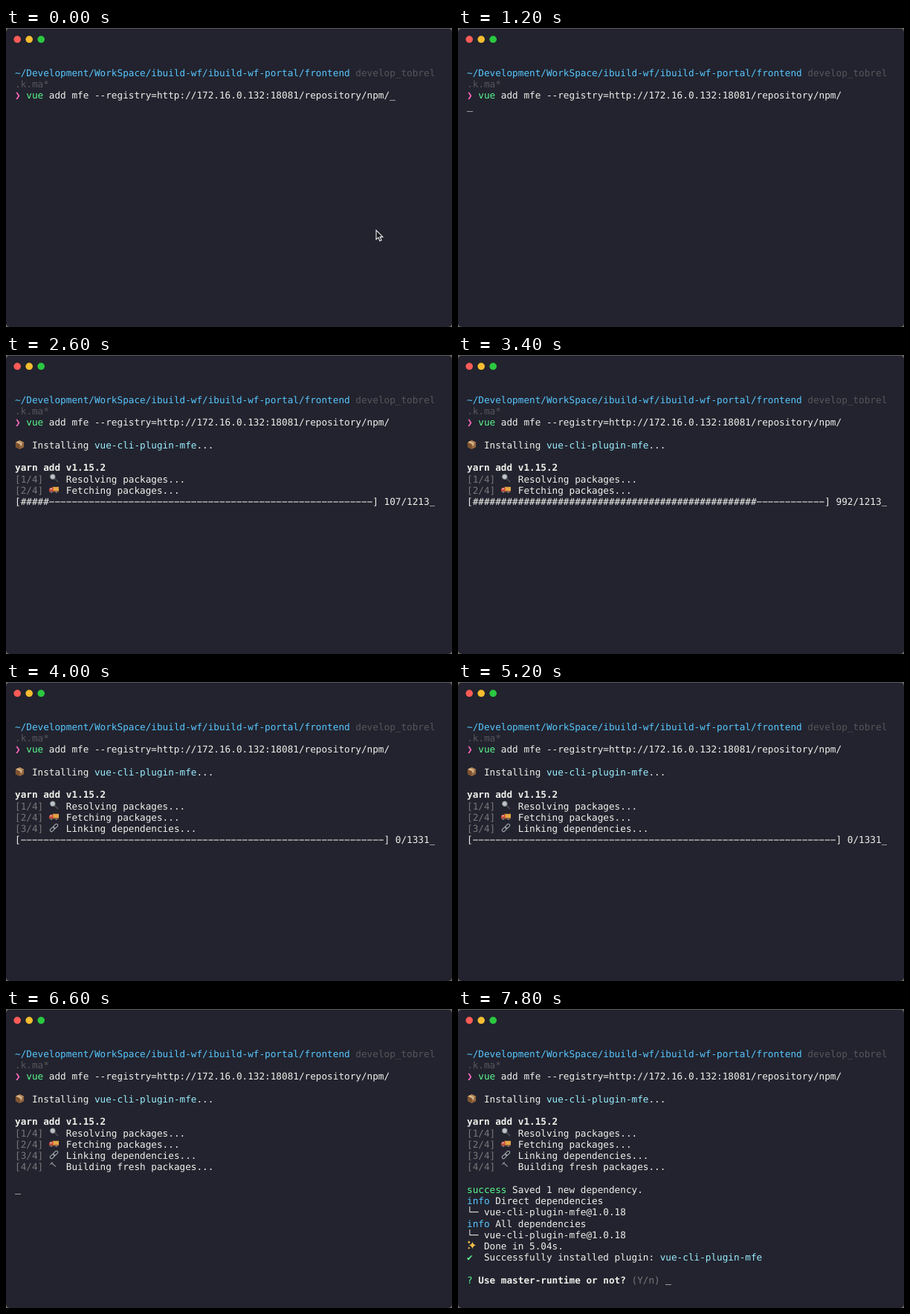
These frames come from a looping animation (600 px wide and 403 px high, 8000 ms). An HTML page:

```html
<!DOCTYPE html>
<html lang="en">
<head>
<meta charset="utf-8">
<title>Terminal</title>
<style>
  html, body { margin: 0; width: 100%; height: 100%; overflow: hidden; background: #77726a; }
  #window {
    position: absolute; left: 0; top: 0; width: 600px; height: 403px; overflow: hidden;
    background: #22232e; border-radius: 5px; box-shadow: inset 0 1px #5c5b5e;
  }
  #lights, #pointer { position: absolute; left: 0; top: 0; }
  #screen {
    position: absolute; left: 12px; top: 52.9px; color: #eff0eb;
    font: 12.69px/15.25px "DejaVu Sans Mono", monospace;
    text-rendering: geometricPrecision; font-variant-ligatures: none;
  }
  .line { position: absolute; left: 0; white-space: pre; }
  .blue { color: #57c7ff; }
  .green { color: #5af78e; }
  .pink { color: #ff6ac1; }
  .cyan { color: #9aedfe; }
  .grey { color: #77777a; }
  .dim { color: #56575c; }
  .sign { display: inline-block; width: 1ch; }
  .icon { display: inline-block; width: 2ch; height: 13px; vertical-align: -1px; }
  #cursor { position: absolute; width: 1ch; height: 1px; margin-top: 13.2px; background: #98999b; }
</style>
</head>
<body>
<svg width="0" height="0" style="position:absolute">
  <symbol id="box" viewBox="0 0 14 14" preserveAspectRatio="xMinYMid">
    <path d="M1 4 7 1l6 3v7l-6 3-6-3z" fill="#94663f"/>
    <path d="M1 4 7 7v7l-6-3z" fill="#7d5230"/>
    <path d="M1 4 7 1l6 3-6 3z" fill="#b98a5c"/>
    <path d="m4 2.5 6 3v3l-2 1v-3l-6-3z" fill="#dcc096"/>
  </symbol>
  <symbol id="lens" viewBox="0 0 14 14" preserveAspectRatio="xMinYMid">
    <path d="m8 7 4.5 4.5" stroke="#46474d" stroke-width="2" stroke-linecap="round"/>
    <circle cx="5.2" cy="4.4" r="3.6" fill="#bcc4c8" stroke="#83878c"/>
  </symbol>
  <symbol id="truck" viewBox="0 0 14 14" preserveAspectRatio="xMinYMid">
    <path d="M5 3h9v6.5H5z" fill="#e3a545"/>
    <path d="M0 9.5V6.5L1.5 4H6v5.5z" fill="#d94d38"/>
    <path d="M1.2 6.5 2.2 5H4v1.5z" fill="#bfe0ee"/>
    <path d="M0 9h14v1.5H0z" fill="#8c4a35"/>
    <circle cx="3.2" cy="10.5" r="1.4" fill="#77797e"/>
    <circle cx="10.5" cy="10.5" r="1.4" fill="#77797e"/>
  </symbol>
  <symbol id="link" viewBox="0 0 14 14" preserveAspectRatio="xMinYMid">
    <g fill="none" stroke="#a9adb2" stroke-width="1.1" transform="rotate(-45 7 7)">
      <rect x="0" y="5" width="7.5" height="4" rx="2"/>
      <rect x="6.5" y="5" width="7.5" height="4" rx="2"/>
    </g>
  </symbol>
  <symbol id="hammer" viewBox="0 0 14 14" preserveAspectRatio="xMinYMid">
    <path d="M1.5 5 5 1.5M4 3l5.5 5" fill="none" stroke="#a4a6a9" stroke-width="1.1"/>
  </symbol>
  <symbol id="sparkles" viewBox="0 0 14 14" preserveAspectRatio="xMinYMid" fill="#f0c04a">
    <path d="M8 2q.8 4.2 5 5-4.2.8-5 5-.8-4.2-5-5 4.2-.8 5-5z"/>
    <path d="M3 0q.4 2 2.3 2.5Q3.4 3 3 5q-.4-2-2.3-2.5Q2.6 2 3 0zM3 9q.3 1.7 2 2-1.7.3-2 2-.3-1.7-2-2 1.7-.3 2-2z"/>
  </symbol>
</svg>

<div id="window">
  <svg id="lights" width="60" height="30">
    <circle cx="15.2" cy="15.3" r="4.8" fill="#fc5b57"/>
    <circle cx="31.2" cy="15.3" r="4.8" fill="#f5bd30"/>
    <circle cx="47.2" cy="15.3" r="4.8" fill="#2bc840"/>
  </svg>
  <div id="screen"><div id="bar" class="line"></div><div id="cursor"></div></div>
  <svg id="pointer" width="600" height="403">
    <path d="M498 272.5v12.5l2.9-2.6 2 4.6 2.2-1-2-4.4h3.8z" fill="#17171c" stroke="#eee" stroke-width="1.1"/>
  </svg>
</div>

<script>
const LOOP = 8000, STEP = 200, ROW = 15.25, COLUMNS = 74;
const ENTER = 600, INSTALL = 1600, YARN = 2000, FETCH = 2400, LINK = 3800,
      BUILD = 6400, SAVED = 6800, DONE = 7000, PROMPT = 7200;

const $ = id => document.getElementById(id);
const paint = (style, text) => `<span class="${style}">${text}</span>`;
const icon = name => `<svg class="icon"><use href="#${name}"/></svg>`;
const stage = (n, name, text) => `${paint('grey', `[${n}/4]`)} ${icon(name)} ${text}...`;
const plugin = 'vue-cli-plugin-mfe';
const tree = `└─ ${plugin}@1.0.18`;

// [row, time of appearance, markup]
const lines = [
  [0, 0, paint('blue', '~/Development/WorkSpace/ibuild-wf/ibuild-wf-portal/frontend') + paint('dim', ' develop_tobrel')],
  [1, 0, paint('dim', '.k.ma*')],
  [2, 0, `${paint('pink sign', '❯')} ${paint('green', 'vue')} add mfe --registry=http://172.16.0.132:18081/repository/npm/`],
  [4, INSTALL, `${icon('box')} Installing ${paint('cyan', plugin)}...`],
  [6, YARN, '<b>yarn add v1.15.2</b>'],
  [7, YARN, stage(1, 'lens', 'Resolving packages')],
  [8, FETCH, stage(2, 'truck', 'Fetching packages')],
  [9, LINK, stage(3, 'link', 'Linking dependencies')],
  [10, BUILD, stage(4, 'hammer', 'Building fresh packages')],
  [12, SAVED, `${paint('green', 'success')} Saved 1 new dependency.`],
  [13, SAVED, `${paint('blue', 'info')} Direct dependencies`],
  [14, SAVED, tree],
  [15, SAVED, `${paint('blue', 'info')} All dependencies`],
  [16, SAVED, tree],
  [17, DONE, `${icon('sparkles')} Done in 5.04s.`],
  [18, PROMPT, `${paint('green sign', '✔')}  Successfully installed plugin: ${paint('cyan', plugin)}`],
  [20, PROMPT, `${paint('green', '?')} <b>Use master-runtime or not?</b> ${paint('grey', '(Y/n)')}`]
].map(([row, from, markup]) => {
  const el = document.createElement('div');
  el.className = 'line';
  el.style.top = row * ROW + 'px';
  el.innerHTML = markup;
  $('screen').append(el);
  return { el, from };
});

// [time, row, column]
const cursorStops = [
  [0, 2, 66], [ENTER, 3, 0], [INSTALL, 6, 0], [YARN, 8, 0], [FETCH, 9, COLUMNS - 1],
  [LINK, 10, COLUMNS - 1], [BUILD, 12, 0], [SAVED, 17, 0], [DONE, 18, 0], [PROMPT, 20, 35]
];

const ramp = (t, from, to) => Math.min(1, Math.max(0, (t - from) / (to - from)));

function progress(t) {
  if (t < FETCH || t >= BUILD) return '';
  const fetching = t < LINK;
  const total = fetching ? 1213 : 1331;
  const count = fetching
    ? (t < 2600 ? 0 : Math.round(107 + (total - 107) * ramp(t, 2600, 3600)))
    : Math.round(total * ramp(t, 5200, 6200));
  const label = `${count}/${total}`;
  const width = COLUMNS - 4 - label.length;
  const filled = Math.floor(width * count / total);
  // The minus sign gives the wide dashes of the bar.
  return `[${'#'.repeat(filled)}${'−'.repeat(width - filled)}] ${label}`;
}

function render(now) {
  const t = Math.floor(now % LOOP / STEP) * STEP;
  for (const { el, from } of lines) el.style.visibility = t >= from ? 'visible' : 'hidden';
  $('bar').textContent = progress(t);
  $('bar').style.top = (t < LINK ? 9 : 10) * ROW + 'px';
  const [, row, column] = cursorStops.filter(stop => stop[0] <= t).pop();
  $('cursor').style.top = row * ROW + 'px';
  $('cursor').style.left = column + 'ch';
  $('pointer').style.visibility = t < ENTER ? 'visible' : 'hidden';
}

function tick() {
  render(performance.now());
  requestAnimationFrame(tick);
}
tick();
</script>
</body>
</html>
```
